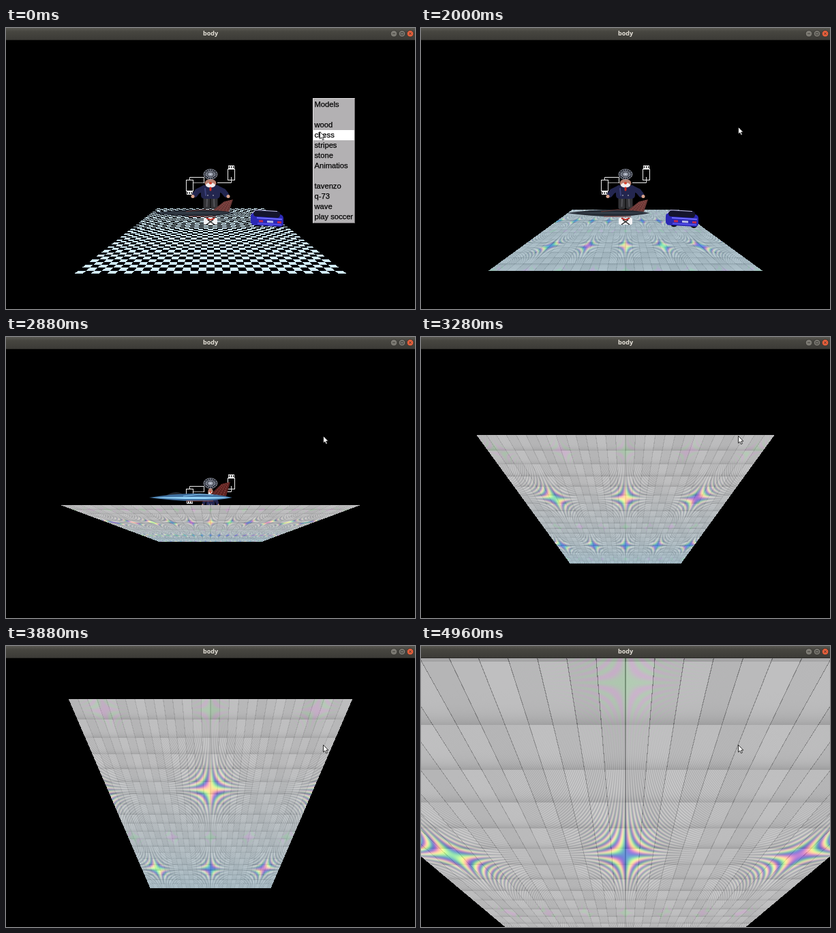
Animation, 600 px wide and 413 px high, one loop 5000 ms. Source, as an HTML page with a canvas:

```html
<!DOCTYPE html>
<html lang="en">
<head>
<meta charset="utf-8">
<title>body</title>
<style>
  html, body { margin: 0; width: 100%; height: 100%; overflow: hidden; background: #000; }
  #stage { position: absolute; left: 0; top: 0; width: 600px; height: 413px; overflow: hidden; }
  canvas, svg { position: absolute; left: 0; top: 0; }
  #bar {
    position: absolute; inset: 0 0 auto 0; height: 18px; box-sizing: border-box;
    background: linear-gradient(#5a5953, #474640 30%, #3c3b37);
    border-bottom: 1px solid #2a2926;
    font: bold 9px/16px "Open Sans", sans-serif; color: #e6e2d9; text-align: center;
  }
  #menu {
    position: absolute; left: 450px; top: 103px; width: 62px; height: 184px; box-sizing: border-box;
    border: 1px solid; border-color: #e4e2e4 #716f71 #716f71 #e4e2e4; padding-top: 1px;
    background: #b3b1b3; color: #000;
    font: 11.2px/14px "Liberation Sans", Arial, sans-serif; -webkit-text-stroke: .25px #000;
  }
  #menu div { height: 15px; padding-left: 1.5px; white-space: nowrap; }
  #menu .on { background: #fff; }
</style>
</head>
<body>
<div id="stage">
  <canvas id="scene" width="600" height="413"></canvas>
  <div id="bar">body</div>
  <div id="menu"></div>
  <svg width="600" height="413">
    <g fill="#7d7b74" stroke="#33322e" stroke-width=".8">
      <circle cx="569" cy="8.3" r="4.8"/>
      <circle cx="581" cy="8.3" r="4.8"/>
      <circle cx="593" cy="8.3" r="4.8" fill="#e8603c"/>
      <path d="M567 8.3h4M579.2 6.6h3.6v3.6h-3.6zM591.3 6.6l3.4 3.4m0-3.4l-3.4 3.4" fill="none"/>
    </g>
    <path id="cursor" d="M0 0V10.5L2.3 8.3L4 12L5.8 11.2L4.2 7.6H7.3Z" fill="#fff" stroke="#000" stroke-width=".8"/>
  </svg>
</div>
<script>
const LOOP = 5000, W = 600, H = 413;
const $ = id => document.getElementById(id);
const ctx = $('scene').getContext('2d');
const menu = $('menu'), cursor = $('cursor');

const items = ['Models', '', 'wood', 'chess', 'stripes', 'stone', 'Animatios', '',
  'tavenzo', 'q-73', 'wave', 'play soccer'];
const rows = items.map(text => {
  const row = document.createElement('div');
  row.textContent = text;
  menu.append(row);
  return row;
});

const lerp = (a, b, p) => a + (b - a) * p;
const ramp = (t, a, b) => Math.min(1, Math.max(0, (t - a) / (b - a)));
const wrap = x => x - Math.round(x);

// The camera orbits below the floor, then flies along its view axis.
const FOCAL = 343, TILT = 45.7 * Math.PI / 180;
function viewAt(t, chess) {
  const p = ramp(t, 2380, 2880);
  const tilt = chess ? -0.02 : TILT * ramp(t, 2380, 3576);
  const dolly = 1.46 * (1 - (1 - ramp(t, 3880, 4180)) ** 3);
  const sin = Math.sin(tilt), cos = Math.cos(tilt);
  const radius = lerp(3.05, 3.3, p), half = lerp(1.35, 1.6, p), lift = 0.73;
  const depth = radius - lift * sin - dolly;
  return {
    horizon: 210 + FOCAL * sin / cos,
    height: (lift - radius * sin + dolly * sin) / cos,
    near: (depth - half * cos) / FOCAL,
    far: (depth + half * cos) / FOCAL
  };
}

const floor = document.createElement('canvas');
floor.width = W;
floor.height = H;
const floorCtx = floor.getContext('2d');
const image = floorCtx.createImageData(W, H), px = image.data;
const GRAIN = 302, COLS = 15, ROWS = 20;

function chessPixel(o, X, s) {
  const dark = (Math.floor((X + 1) * 16.5) + Math.floor(s * 50)) & 1;
  px[o] = dark ? 0 : 208;
  px[o + 1] = dark ? 0 : 234;
  px[o + 2] = dark ? 4 : 246;
}

// Fine grain sampled once per pixel beats into coloured stars.
function woodPixel(o, X, s, w, slope, tint) {
  const fx = wrap(GRAIN / w), fy = wrap(GRAIN / w * X * slope);
  const f2 = fx * fx + fy * fy;
  const phase = 2 * Math.PI * GRAIN * X;
  const c = Math.cos(phase), sn = Math.sin(phase);

  const col = Math.floor((X + 1) * COLS), r = s * ROWS, row = Math.floor(r);
  const pitch = w / COLS;
  let lum = ((col * 7 + row * 13) % 5 - 2) * 2.5 - 24 * (r - row) ** 6;
  if (Math.abs(wrap(X * COLS) * pitch) < 0.6) lum -= Math.min(60, pitch * 1.4);
  lum += 26 * Math.exp(-f2 / 0.12) * c;

  const hue = f2 < 0.1 ? 56 * Math.exp(-f2 / 0.018) : 0;
  let pink = 0;
  if (Math.abs(fx) > 0.3) {
    const gx = wrap(2 * fx), gy = wrap(2 * fy);
    pink = 13 * Math.exp(-(gx * gx + gy * gy) / 0.02) * (c * c - sn * sn);
  }
  px[o] = lerp(186, 165, tint) + lum + hue * (0.95 * c + 0.3 * sn) + pink;
  px[o + 1] = 186 + lum + hue * (0.25 * c - 0.95 * sn) - pink;
  px[o + 2] = lerp(187, 196, tint) + lum + hue * (0.35 * sn - 0.95 * c) + pink;
}

let floorKey = '';
function drawFloor(view, chess) {
  const key = Object.values(view).join() + chess;
  if (key === floorKey) return;
  floorKey = key;
  px.fill(0);
  const { horizon, height, near, far } = view;
  const slope = 1 / Math.abs(height);
  for (let y = 17; y < H; y++) {
    const w = (y + 0.5 - horizon) / height, z = 1 / w;
    if (!(z >= near && z <= far)) continue;
    const s = (z - near) / (far - near);
    const tint = height > 0 ? 0.9 : ramp(z, 0.006, 0.012);
    const right = Math.min(W, Math.round(300 + w));
    for (let x = Math.max(0, Math.round(300 - w)); x < right; x++) {
      const o = (y * W + x) * 4, X = (x - 299.5) / w;
      if (chess) chessPixel(o, X, s);
      else woodPixel(o, X, s, w, slope, tint);
      px[o + 3] = 255;
    }
  }
  floorCtx.putImageData(image, 0, 0);
}

function line(color, width, ...pts) {
  ctx.beginPath();
  for (let i = 0; i < pts.length; i += 2) ctx.lineTo(pts[i], pts[i + 1]);
  ctx.strokeStyle = color;
  ctx.lineWidth = width;
  ctx.stroke();
}

function oval(color, x, y, rx, ry = rx) {
  ctx.beginPath();
  ctx.ellipse(x, y, rx, ry, 0, 0, 7);
  ctx.fillStyle = color;
  ctx.fill();
}

function box(color, x, y, w, h, r = 0) {
  ctx.beginPath();
  ctx.roundRect(x, y, w, h, r);
  ctx.fillStyle = color;
  ctx.fill();
}

// A slim body pointed at both ends.
function spindle(color, x, y, length, up, down) {
  ctx.beginPath();
  ctx.moveTo(x, y);
  ctx.quadraticCurveTo(x + length * 0.6, y - 2 * up, x + length, y);
  ctx.quadraticCurveTo(x + length * 0.6, y + 2 * down, x, y);
  ctx.fillStyle = color;
  ctx.fill();
}

function drawHand(x, y, fingers) {
  ctx.strokeRect(x, y, 10, 16);
  for (let i = 0; i < 3; i++) ctx.strokeRect(x + 1 + i * 3, fingers, 2, 4);
}

function drawWires() {
  line('#999', 1, 274, 227.5, 290, 227.5);
  line('#eee', 1, 290.5, 228, 290.5, 219.5, 269.5, 219.5, 269.5, 223);
  line('#eee', 1, 310, 227.5, 330.5, 227.5, 330.5, 219);
  drawHand(264.5, 223.5, 240.5);
  drawHand(325.5, 207.5, 202.5);
}

function drawHelmet() {
  oval('#10131c', 300, 215, 10, 7.5);
  ctx.strokeStyle = '#cdd3e2';
  ctx.lineWidth = 0.6;
  for (const r of [0.3, 0.65, 1]) {
    ctx.beginPath();
    ctx.ellipse(300, 215, 10 * r, 7.5 * r, 0, 0, 7);
    ctx.stroke();
  }
  for (let a = 0; a < 6.2; a += Math.PI / 8) {
    line('#cdd3e2', 0.6, 300, 215, 300 + 10 * Math.cos(a), 215 + 7.5 * Math.sin(a));
  }
}

function drawFigure(squeeze) {
  const navy = '#23264f';
  ctx.save();
  ctx.translate(300, 0);
  ctx.scale(squeeze, 1);
  ctx.lineCap = 'round';
  for (const side of [-1, 1]) {
    box('#333336', side * 5.5 - 5, 248, 10, 18, 2);
    line('#55555a', 2, side * 5, 252, side * 5.5, 262);
    line(navy, 8, side * 11, 236, side * 19, 240, side * 23, 245);
    oval('#d9a38c', side * 26, 247.5, 2.5);
  }
  box(navy, -14, 231, 28, 20, 5);
  line('#3c427c', 2, -8, 236, -7, 246);
  for (const side of [-1, 1]) oval('#ddd', side * 4, 246, 0.8);
  oval('#b98070', 0, 228, 8.5, 6);
  oval('#f4eeee', 0, 231, 7, 3.5);
  oval('#d8402c', 0, 228, 2.2, 1.8);
  line('#d02a20', 3, 0, 235, 0, 238);
  ctx.restore();
  drawHelmet();
}

function drawCar(drop) {
  ctx.save();
  ctx.translate(0, drop);
  ctx.transform(1, 0.06, 0, 1, 0, -22);
  for (const x of [371, 400]) oval('#08080f', x, 288, 5, 4);
  box('#2b28b4', 359, 272, 48, 18, 5);
  box('#14142c', 363, 267, 39, 10, 4);
  line('#c3c2ee', 1, 361, 273, 366, 267.5, 398, 267.5);
  line('#6f6bff', 2, 368, 279, 405, 279);
  line('#5450ee', 2, 369, 287, 404, 287);
  for (const x of [371, 398]) box('#c22a50', x, 282, 6, 3);
  box('#b9bce8', 383, 282, 9, 3);
  ctx.restore();
}

function drawBall() {
  box('#f4f4f6', 290, 279, 20, 10, 2);
  for (const side of [-1, 1]) {
    line('#b82a22', 2, 300, 282, 300 + side * 6, 279.5);
    line('#222', 1.5, 300 - side * 6, 289, 300 + side * 4, 282);
  }
}

function drawPlane(p) {
  const x = lerp(214, 210, p), y = lerp(272, 236, p);
  const shade = (lo, hi) => `color-mix(in srgb, ${hi} ${p * 100}%, ${lo})`;
  spindle('#23272e', x + 22, y - 1, 32, lerp(3, 7, p), 1);
  ctx.beginPath();
  ctx.moveTo(x + 88, y - 3);
  ctx.lineTo(x + 106, y - 17 - 3 * p);
  ctx.lineTo(x + 119, y - 20 - 3 * p);
  ctx.lineTo(x + 113, y - 2);
  ctx.fillStyle = shade('#6a3836', '#5c2220');
  ctx.fill();
  ctx.setLineDash([1.5, 1.5]);
  for (let i = 0; i < 4; i++) {
    line('#b8625c', 0.8, x + 94 + i * 5, y - 4, x + 107 + i * 3, y - 16 - i - 3 * p);
  }
  ctx.setLineDash([]);
  spindle(shade('#262c36', '#4070a0'), x, y, 122, lerp(5, 6, p), 5);
  spindle(shade('#3c4854', '#96d6fa'), x + 4, y, 116, 1, lerp(0.5, 2, p));
  line(shade('#643a38', '#82bee6'), 1.2, x + 50, y - 2, x + 74, y - 5, x + 94, y - 4);
  line('#8a4540', 1.2, x + 54, y + 5, x + 94, y + 5);
}

function draw(t) {
  const chess = t < 1720, view = viewAt(t, chess);
  const p = ramp(t, 2380, 2880), above = view.height > 0;
  ctx.fillStyle = '#000';
  ctx.fillRect(0, 0, W, H);
  drawFloor(view, chess);
  if (above) ctx.drawImage(floor, 0, 0);
  drawWires();
  drawFigure(1 - 0.55 * p);
  drawCar(-15 * p);
  drawBall();
  drawPlane(p);
  if (!above) ctx.drawImage(floor, 0, 0);

  menu.style.display = t < 1200 ? '' : 'none';
  const chosen = t < 620 ? 'chess' : 'wood';
  rows.forEach((row, i) => row.classList.toggle('on', items[i] === chosen));
  const q = ramp(t, 400, 760), r = ramp(t, 1100, 1200);
  cursor.setAttribute('transform', `translate(${460.5 + 4 * q + r} ${152.5 - 6 * q - r})`);
}

function tick() {
  draw(performance.now() % LOOP);
  requestAnimationFrame(tick);
}
tick();
</script>
</body>
</html>
```
